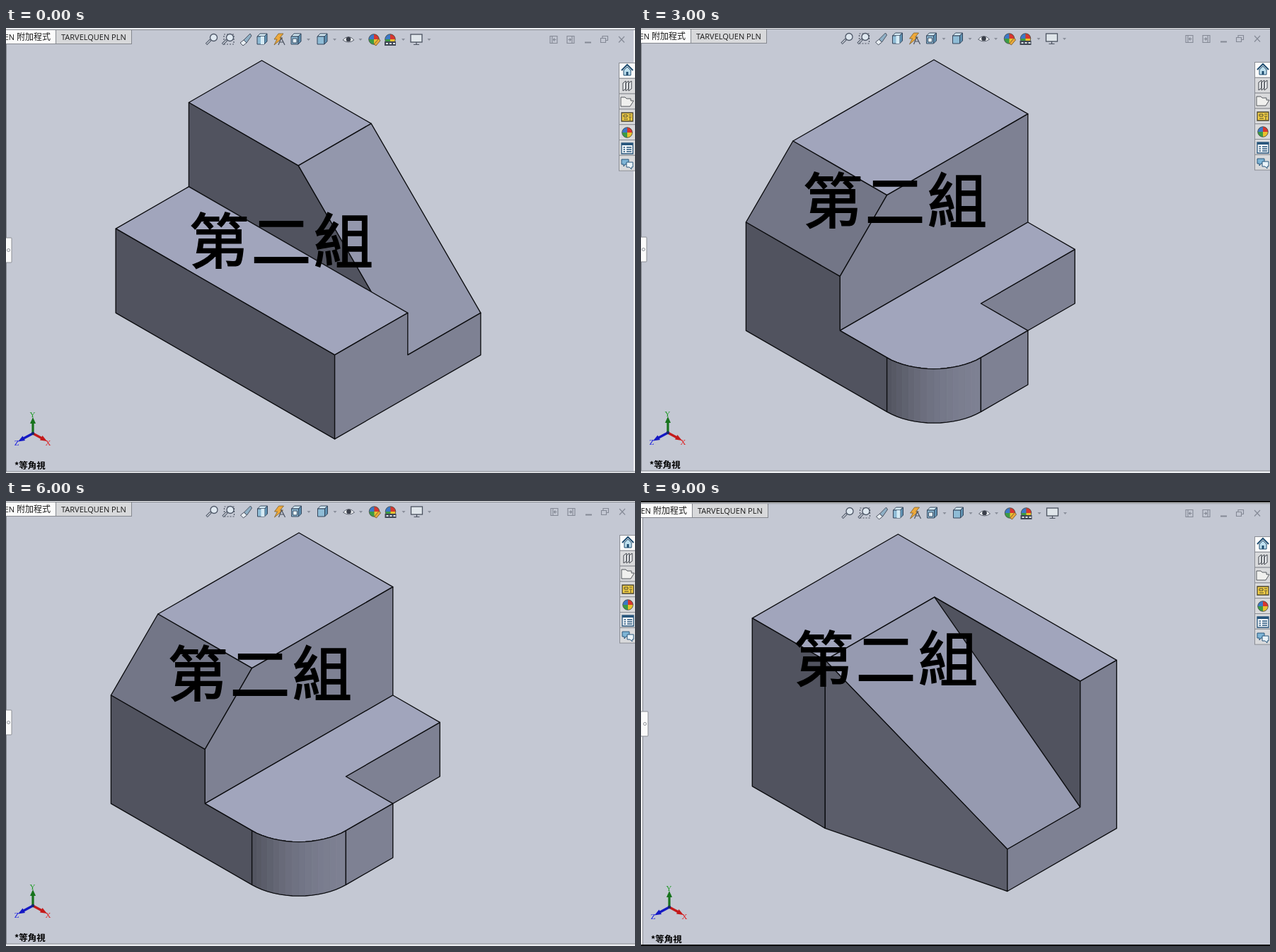
An HTML page that plays this animation: 889x630 px, repeating every 10 s.

```html
<!DOCTYPE html>
<html lang="zh-Hant">
<head>
<meta charset="utf-8">
<title>Isometric solids</title>
<style>
html, body { margin: 0; width: 100%; height: 100%; overflow: hidden; background: #c4c8d3; }
svg { display: block; width: 100%; height: 100%; }
.cjk { font-family: "Noto Sans CJK TC", "Noto Sans CJK", "Noto Sans CJK JP", sans-serif; }
.tab { font: 11px "Open Sans", sans-serif; fill: #1a1a1a; }
.axis { font: 11px "Liberation Serif", serif; text-anchor: middle; }
#solid path { stroke-linejoin: round; }
#title { font-size: 84px; letter-spacing: 4px; stroke: #000; stroke-width: 2; }
.ic { fill: none; stroke: #4b5260; stroke-width: 1.2; }
</style>
</head>
<body>
<svg viewBox="0 0 889 630">
  <defs>
    <g id="lens">
      <path d="M-8 7L-2 1" stroke="#4d5666" stroke-width="3.4"/>
      <path d="M-7.5 6.5L-2.5 1.5" stroke="#d5dae2" stroke-width="1.2"/>
      <circle cx="2.5" cy="-2.5" r="5" fill="#dfe8f0" stroke="#4d5666" stroke-width="1.3"/>
    </g>
    <g id="ball">
      <circle r="7.3" fill="#3c9b45"/>
      <path d="M0 0V-7.3A7.3 7.3 0 0 0-7.3 0z" fill="#3c78c8"/>
      <path d="M0 0V-7.3A7.3 7.3 0 0 1 7.3 0z" fill="#d8372f"/>
      <path d="M0 0H7.3A7.3 7.3 0 0 1 0 7.3z" fill="#e9c02e"/>
      <circle r="7.3" fill="none" stroke="#4a4a4a" stroke-width=".8"/>
    </g>
    <g id="cube" stroke="#35465c">
      <path d="M-7-4L-3-8H7L3-4z" fill="#d6ebf5"/>
      <path d="M-7-4H3V7H-7z" fill="#8fbcd6"/>
      <path d="M3-4L7-8V3L3 7z" fill="#5d8fb0"/>
    </g>
  </defs>

  <rect width="889" height="630" fill="#c4c8d3"/>
  <g id="solid"></g>

  <g id="rim">
    <rect x="-9" y="-9" width="910" height="11" fill="#eceef1"/>
    <path d="M-9 2.5H900" stroke="#85888f"/>
    <path d="M487-1.5H541" stroke="#707379" stroke-width="1.6"/>
  </g>

  <g id="left">
    <rect x="-9" y="2" width="9" height="640" fill="#f4f5f7"/>
    <path d="M.5 2V640" stroke="#85888f"/>
    <rect x="-9" y="2.5" width="79.5" height="20" fill="#fbfbfb" stroke="#85888f"/>
    <rect x="70.5" y="2.5" width="107" height="20" fill="#d8d9db" stroke="#85888f"/>
    <text class="tab" x="63" y="17" text-anchor="end">TARVELQUEN <tspan class="cjk" font-size="12">附加程式</tspan></text>
    <text class="tab" x="78" y="17">TARVELQUEN PLN</text>
    <rect x="-5" y="297" width="13" height="35" rx="1" fill="#fafafa" stroke="#8b8e95"/>
    <circle cx="3.5" cy="314.5" r="2" fill="none" stroke="#8b8e95"/>
  </g>

  <g id="tools">
    <use href="#lens" x="291" y="16"/>
    <g transform="translate(314 16)">
      <rect x="-6" y="-7" width="14" height="14" class="ic" stroke-dasharray="2 2"/>
      <use href="#lens"/>
    </g>
    <g transform="translate(339 16)" stroke="#4b5260">
      <path d="M-8 5L-3 1L1 5L-4 9z" fill="#e8eef3"/>
      <path d="M-3 1L6-8L8-5L1 5z" fill="#8fb0c6"/>
    </g>
    <g transform="translate(362 16)">
      <use href="#cube"/><path d="M-2-4H3V7H-2z" fill="#d6ebf5"/>
    </g>
    <g transform="translate(386 16)">
      <path d="M-1-8L6-8L1-2H5L-7 8L-3 0H-7z" fill="#eea93b" stroke="#7a5d2b" stroke-width=".8"/>
      <path d="M-1 8L3-2L8 8M1 4H6" class="ic"/>
    </g>
    <g transform="translate(410 16)">
      <use href="#cube"/><path d="M-5-1H1V5H-5z" fill="#e3eff6" stroke="#35465c"/>
    </g>
    <use href="#cube" x="447" y="16"/>
    <g transform="translate(484 16)">
      <path d="M-8 1Q0-8 8 1Q0 7-8 1z" fill="#eef0f3" stroke="#5c626e"/>
      <circle r="3.3" fill="#3a3f4a"/>
    </g>
    <g transform="translate(520 16)">
      <use href="#ball"/>
      <path d="M0 7L7-1L9 2L3 9z" fill="#e9a93b" stroke="#6b5128" stroke-width=".8"/>
    </g>
    <g transform="translate(543 16)">
      <use href="#ball"/>
      <path d="M-8 3H8V9H-8z" fill="#3f4653"/>
      <path d="M-6 6H7" stroke="#dfe5ea" stroke-width="2" stroke-dasharray="3 2"/>
    </g>
    <g transform="translate(580 16)">
      <rect x="-8" y="-7" width="16" height="11" fill="#dfe5ea" stroke="#4b5260" stroke-width="1.3"/>
      <path d="M0 4V7M-4 7.5H4" class="ic"/>
    </g>
    <path fill="#8a8f9b" d="M425 15h5l-2.500 3zM462 15h5l-2.500 3zM498.500 15h5l-2.500 3zM559 15h5l-2.500 3zM595.500 15h5l-2.500 3z"/>
  </g>

  <g id="right">
    <g fill="none" stroke="#848995" stroke-width="1.1">
      <path d="M769 11.500h10v10h-10zM772 11.500v10M777.500 16.500h-4m2-2l-2 2l2 2"/>
      <path d="M793 11.500h10v10h-10zM800 11.500v10M794.500 16.500h4m-2-2l2 2l-2 2"/>
      <path d="M818 20.500h9" stroke-width="2"/>
      <path d="M840.500 14.500h7v6h-7zM843 14v-2.500h7.500v6h-2.500"/>
      <path d="M866 12l8 8.500M874 12l-8 8.500"/>
    </g>
    <rect id="edge" x="887" y="3" width="6" height="640" fill="#f1f2f4"/>
    <g id="panes"></g>
    <g transform="translate(878 60)" stroke="#1f4d70">
      <path d="M-5 0L0-5L5 0V7H-5z" fill="#bfe0ee"/>
      <path d="M-8 0L0-8L8 0" fill="none" stroke-width="2"/>
      <path d="M0 2V7" stroke-width="3"/>
    </g>
    <path transform="translate(878 82)" fill="#eef0f2" stroke="#3c4048"
      d="M-6-4l4-3v11l-4 3zM-2-4l4-3v11l-4 3zM2-4l4-3v11l-4 3z"/>
    <path d="M869 111V98h6l2 2h6v3h4l-5 8z" fill="#f0f0ee" stroke="#55585e"/>
    <g transform="translate(878 126)" stroke="#4b4632">
      <path d="M-8-6H8V6H-8z" fill="#f3cf45" stroke-width="1.3"/>
      <path d="M-5-3H0V0H-5zM2-3H6M2 0H6M-5 3H1M4 1V5" fill="none"/>
    </g>
    <use href="#ball" x="878" y="148"/>
    <g transform="translate(878 170)" stroke="#28567c" stroke-width="1.3">
      <path d="M-8-7H8V8H-8z" fill="#f3f7fa"/>
      <path d="M-8-5.500H8" stroke-width="3"/>
      <path d="M-5.500-1H6M-5.500 2H6M-5.500 5H6" stroke-dasharray="2.500 2 7"/>
    </g>
    <g transform="translate(878 192)" stroke="#28567c">
      <path d="M-8-6H2V1H-3L-5 4V1H-8z" fill="#7fb5d6"/>
      <path d="M-1-2H8V5H6V8L3 5H-1z" fill="#eaf3f8"/>
    </g>
  </g>

  <g id="foot">
    <rect x="-9" y="628" width="910" height="12" fill="#eceef1"/>
    <path d="M-9 628H900" stroke="#85888f"/>
    <g stroke-width="3.2">
      <path d="M38 574V557" stroke="#17731c"/>
      <path d="M38 574l-14 7.500" stroke="#1418c4"/>
      <path d="M38 574l13 7" stroke="#c41a1a"/>
    </g>
    <path d="M38 551l4 9h-8z" fill="#17731c"/>
    <path d="M17 585.500l6.500-8l3.500 6.500z" fill="#1418c4"/>
    <path d="M58 585l-6.500-8l-3.500 6.500z" fill="#c41a1a"/>
    <circle cx="38" cy="574" r="2.2" fill="#1a2a6a"/>
    <text class="axis" x="37.500" y="551" fill="#1c9a22">Y</text>
    <text class="axis" x="15" y="590.500" fill="#1418e0">Z</text>
    <text class="axis" x="59.500" y="590.500" fill="#e01a1a">X</text>
    <text class="cjk" x="12" y="623.500" font-size="12.500" font-weight="700">*等角視</text>
  </g>

  <text id="title" class="cjk">第二組</text>
  <path id="bars" d="M0 .9H889M0 629H889" stroke="#000" stroke-width="2"/>
</svg>

<script>
const $ = id => document.getElementById(id);
const SLOT = 1000, ARC_STEPS = 16;

// Each face: a start on the screen grid, then moves along the axes.
// Two moves make a parallelogram, more a closed polygon; "a~b" is a quarter arc.
// Faces are listed from back to front.
const solids = [
  { x: 361.5, u: 51.57, title: [261, 264], jog: [0, 0, 0], faces: `
    0,0 x3 z2
    3,3 x3y-3 z2
    -2,2 x3 x2y-2 x-5
    -2,6 x6 z2
    -4,8 x6 y-2
    2,14 z-2 y-1 z-2 y-1 z4` },
  { x: 355.5, u: 57.95, title: [257, 190], jog: [1, -1, -1], faces: `
    0,0 x3 z2y-1
    -2,4 x3 y-1
    1,7 z-2y1 y-2 z2
    -3,7 x2 y-1
    -2,6 x3 z-2 x3 x-3z4 x-1 z-1 x-2
    -2,10 x1 y-1
    -1,11 x3z-4 y-1` },
  { x: 441, u: 54.65, title: [261, 249], jog: [0, 1, -1], faces: `
    0,0 x2 z2
    -2,2 x2 x2~y-2 y-2 x-2 y3 x-2
    2,2 x2~y-2 z2
    2,10 z-2 y-2
    -2,4 y-1~z1 x2
    -3,7 x2 z1
    -4,8 z1~y-1 x2
    -2,10 z-1 z-1~y1 y-3 z3 y1 y1~z-1
    -5,11 x2 y-1` },
  { x: 355.3, u: 57.95, title: [209, 200], jog: [0, -1, 1], faces: `
    0,0 x2 z4
    2,2 z4 y-2
    2,6 x4 z4
    2,4 x2 z1
    1,5 x2 y-1
    3,7 z-1 y-1
    -1,7 x2 z1
    0,10 z-1 y-1
    -4,4 x2 y-1 x2 y-1 x2 y-1 x-6
    2,14 z-4 y-1` },
  { x: 414, u: 66.4, title: [231, 207], jog: [0, 1, -1], faces: `
    0,0 x2 z3
    -3,3 x2 z1y-1
    2,2 y-2 z4 y1 z-1y1
    1,9 z-2 y-1
    -2,10 z-4 x1 z2 x1 z1 z1~x-1
    -4,6 x2 y-1 x1 y-1 x-3
    -1,11 x1~z-1 y-1
    1,11 z-1 y-1` },
  { x: 413, u: 77.25, title: [189, 160], jog: [0, -1, 3], faces: `
    0,2 x2y-2 z2
    0,2 x3 y-2 x-1
    0,0 x4 z1 x-3 z2 x1 z1 x-2
    -2,6 x2y-2 z-1
    3,5 z-1 y-2
    -4,4 x2 x2y-2 x-4` },
  { x: 363.3, u: 51.5, title: [218, 186], jog: [2, 1, 1], bars: true, faces: `
    0,0 x6 z1 x-4 z3 x-2
    1,3 x4 y-3
    1,3 x4y-3 z2 x-4y3z1
    -4,4 x2 y-4
    -2,6 x4z-1y-3 y-1 x-4z1
    5,7 z-1 y-4 z3 y1 z-2` }
];
const order = [0, 3, 1, 4, 2, 3, 4, 5, 0, 6];

const add = (p, v, k = 1) => p.map((c, i) => c + v[i] * k);
const cross = ([a, b, c], [d, e, f]) => [b * f - c * e, c * d - a * f, a * e - b * d];

function vec(move) {
  const v = [0, 0, 0];
  for (const [, axis, n] of move.matchAll(/([xyz])(-?\d+)/g)) v['xyz'.indexOf(axis)] = +n;
  return v;
}

// Points reached from p by one move
function run(p, move) {
  const [a, b] = move.split('~').map(vec);
  if (!b) return [add(p, a)];
  return Array.from({ length: ARC_STEPS }, (_, i) => {
    const t = (i + 1) / ARC_STEPS * Math.PI / 2;
    return add(add(p, a, Math.sin(t)), b, 1 - Math.cos(t));
  });
}

// Ambient light plus directional terms for the normal turned to the viewer
function shade(normal) {
  const size = Math.hypot(...normal) * Math.sign(normal[0] + normal[1] + normal[2]);
  const [x, y, z] = normal.map(c => c / size);
  const v = 135 - 9 * x + 26 * y - 54 * z + 45 * x * z;
  return `rgb(${[1, 1.025, 1.168].map(k => Math.round(v * k))})`;
}

function drawFace(line, { x: left, u, jog }) {
  const path = (pts, fill, stroke, width) => {
    const d = pts.map(([x, y, z]) =>
      [left + (x - z) * u, 46 + jog[2] + (x + z - 2 * y) * u / Math.sqrt(3)]
        .map(c => c.toFixed(1))).join(' ');
    return `<path d="M${d}Z" fill="${fill}" stroke="${stroke}" stroke-width="${width}"/>`;
  };
  const outline = (pts, fill) => path(pts, fill, '#0d0e11', 1.35);

  const [from, ...moves] = line.split(' ');
  const [a, b] = from.split(',').map(Number);
  const start = [(a + b) / 2, 0, (b - a) / 2];

  if (moves.length > 2) {
    const pts = [start];
    for (const m of moves) pts.push(...run(pts[pts.length - 1], m));
    return outline(pts, shade(cross(vec(moves[0]), vec(moves[1]))));
  }

  // Sweep the first edge along the second; arcs become shaded strips
  const side = vec(moves[1]);
  const near = [start, ...run(start, moves[0])];
  const far = near.map(p => add(p, side));
  const strips = near.slice(1).map((p, i) => {
    const fill = shade(cross(add(p, near[i], -1), side));
    return path([near[i], p, far[i + 1], far[i]], fill, fill, 0.7);
  });
  return strips.join('') + outline([...near, ...far.reverse()], 'none');
}

for (const s of solids)
  s.art = s.faces.trim().split(/\n\s*/).map(line => drawFace(line, s)).join('');

$('panes').innerHTML = Array.from({ length: 7 }, (_, i) =>
  `<rect x="866.5" y="${(49.5 + i * 21.8).toFixed(1)}" width="30" height="21.8"
    fill="${i ? '#d9dadc' : '#fafafa'}" stroke="#8b8e95"/>`).join('');

const shift = (id, x, y) => $(id).setAttribute('transform', `translate(${x} ${y})`);

// jog: small offsets of the window's left side, right side and height
function show({ art, title, jog: [left, right, down], bars }) {
  $('solid').innerHTML = art;
  shift('rim', 0, down);
  shift('left', left, down);
  shift('tools', (left + right) / 2, down);
  shift('right', right, down);
  shift('foot', left, down);
  shift('title', title[0] - 2, title[1] + 69);
  $('edge').style.display = right > 0 ? 'none' : '';
  $('bars').style.display = bars ? '' : 'none';
}

const start = performance.now();
let shown = -1;
function tick(now) {
  const slot = Math.floor(Math.max(0, now - start) / SLOT) % order.length;
  if (slot !== shown) show(solids[order[shown = slot]]);
  requestAnimationFrame(tick);
}
tick(start);
</script>
</body>
</html>
```
